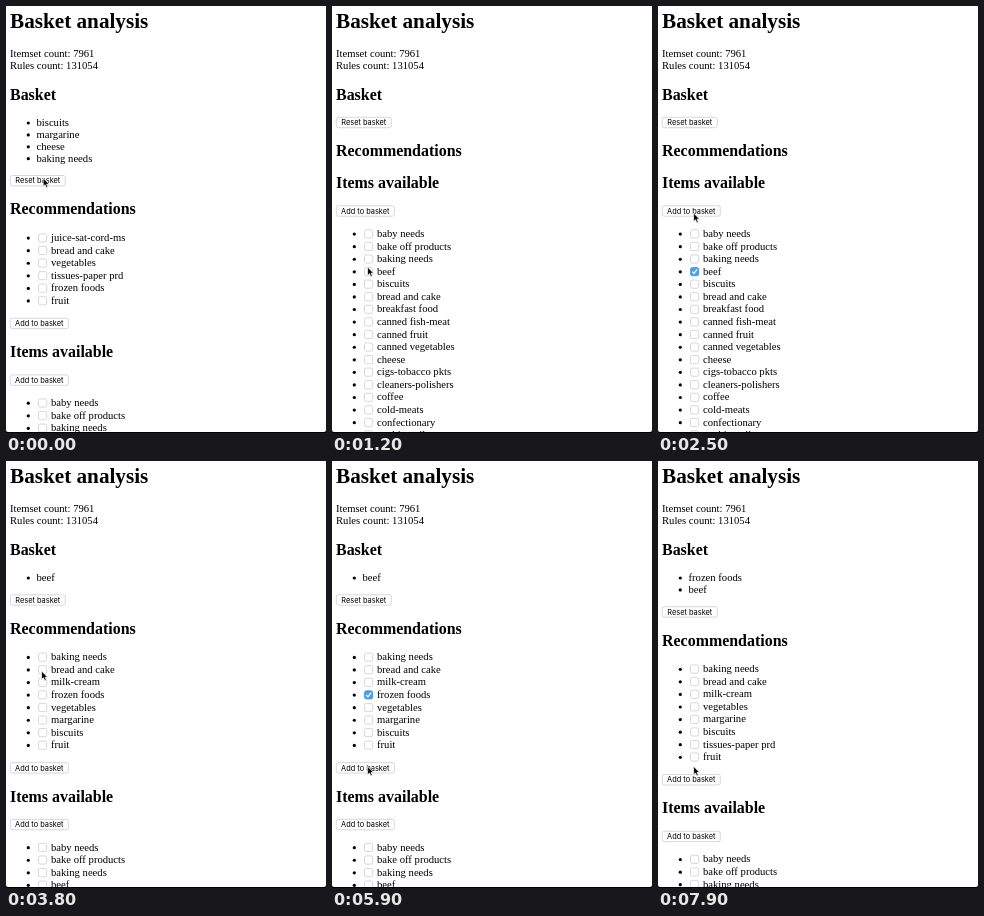
Animation, 320 px wide and 427 px high, one loop 8 s. Source, as an HTML page:

```html
<!DOCTYPE html>
<html lang="en">
<head>
<meta charset="utf-8">
<title>Basket analysis</title>
<style>
  html, body { margin: 0; height: 100%; overflow: hidden; background: #fff; }
  svg { display: block; width: 100%; height: 100%; }
  text { font: 10.64px "Liberation Serif", Times, serif; white-space: pre; }
  .h1 { font-size: 21.2px; font-weight: bold; }
  .h2 { font-size: 15.94px; font-weight: bold; }
  .label { font: 7.4px Inter, "Liberation Sans", sans-serif; text-anchor: middle; }
  .control { fill: #fff; stroke: #c8c8c8; stroke-width: .7; }
  .on { fill: #4a9fea; stroke: #3d8fdc; }
  .pressed { fill: #fff; }
</style>
</head>
<body>
<svg viewBox="0 0 320 427">
  <g id="page"></g>
  <path id="cursor" d="M0 0V8.4L1.9 6.7L3.2 9.7L4.7 9L3.4 6.2H6Z" stroke="#fff" stroke-width=".7"/>
  <path d="M0 424Q0 426 2 426H318Q320 426 320 424V427H0Z"/>
</svg>
<script>
const DURATION = 8000, STEP = 100;
const LINE = 11.9, ROW = 12.57;

const available = ["baby needs", "bake off products", "baking needs", "beef", "biscuits",
  "bread and cake", "breakfast food", "canned fish-meat", "canned fruit", "canned vegetables",
  "cheese", "cigs-tobacco pkts", "cleaners-polishers", "coffee", "cold-meats",
  "confectionary", "cooking oils"];

// Page states, each valid from its start time.
const states = [
  { at: 0, basket: ["biscuits", "margarine", "cheese", "baking needs"],
    tips: ["juice-sat-cord-ms", "bread and cake", "vegetables", "tissues-paper prd", "frozen foods", "fruit"] },
  { at: 100, basket: [], tips: [] },
  { at: 1500, basket: [], tips: [], checked: "beef" },
  { at: 2600, basket: ["beef"],
    tips: ["baking needs", "bread and cake", "milk-cream", "frozen foods", "vegetables", "margarine", "biscuits", "fruit"] }
];
states.push({ ...states[3], at: 5000, checked: "frozen foods" });
states.push({ ...states[4], at: 6000, pressed: true });
states.push({ ...states[4], at: 6100 });
states.push({ at: 6400, basket: ["frozen foods", "beef"],
  tips: ["baking needs", "bread and cake", "milk-cream", "vegetables", "margarine", "biscuits", "tissues-paper prd", "fruit"] });

// Pointer moves: start, end, x, y reached.
const moves = [
  [400, 1200, 35.6, 261], [1800, 2100, 35.6, 225], [2200, 2500, 35.6, 207],
  [3700, 3800, 35.6, 210], [3800, 4600, 35.6, 231], [5300, 5900, 35.6, 305.3]
];

const text = (x, y, str, cls = "") => `<text x="${x}" y="${y}" class="${cls}">${str}</text>`;
const bullet = y => `<circle cx="22.3" cy="${y + .3}" r="1.6"/>`;

function button(y, label, width, pressed) {
  return `<rect x="4.3" y="${y - 5.2}" width="${width}" height="10.4" rx="2" class="control ${pressed ? "on" : ""}"/>`
    + text(4.3 + width / 2, y + 2.7, label, "label" + (pressed ? " pressed" : ""));
}

function checkRow(y, label, checked) {
  const tick = `<path d="M34.3 ${y + .2}l1.7 1.9l3 -4.2" fill="none" stroke="#fff" stroke-width="1.2"/>`;
  return bullet(y)
    + `<rect x="32.5" y="${y - 4}" width="8.2" height="8.2" rx="1.8" class="control ${checked ? "on" : ""}"/>`
    + (checked ? tick : "") + text(45, y + 3.2, label);
}

function drawPage({ basket, tips, checked, pressed }) {
  const rows = (items, top) => items.map((s, i) => checkRow(top + i * ROW, s, s === checked)).join("");
  let out = text(4, 22.3, "Basket analysis", "h1")
    + text(4, 51, "Itemset count: 7961") + text(4, 63, "Rules count: 131054")
    + text(4, 93.7, "Basket", "h2");
  basket.forEach((s, i) => out += bullet(116.7 + i * LINE) + text(30.5, 120 + i * LINE, s));

  let y = basket.length ? 127.1 + basket.length * LINE : 116.5;
  out += button(y, "Reset basket", 55, false);
  y += 28.7;
  out += text(4, y + 5, "Recommendations", "h2");
  if (tips.length) {
    y += 28.4;
    out += rows(tips, y);
    y += tips.length * ROW + 10.2;
    out += button(y, "Add to basket", 58, pressed);
    y += 28.7;
  } else {
    y += 31.8;
  }
  out += text(4, y + 5, "Items available", "h2");
  y += 28;
  out += button(y, "Add to basket", 58, false);
  return out + rows(available, y + 22.8);
}

function pointerAt(t) {
  let x = 37.2, y = 172;
  for (const [start, end, toX, toY] of moves) {
    const p = Math.min(1, Math.max(0, (t - start) / (end - start)));
    const ease = p * p * (3 - 2 * p);
    x += (toX - x) * ease;
    y += (toY - y) * ease;
  }
  return [x, y];
}

const page = document.getElementById("page");
const cursor = document.getElementById("cursor");
let shown;

function render(now) {
  const t = Math.floor(now % DURATION / STEP) * STEP;
  const state = states.findLast(s => s.at <= t);
  if (state !== shown) page.innerHTML = drawPage(shown = state);
  cursor.setAttribute("transform", `translate(${pointerAt(t)})`);
}

const origin = performance.now();
function loop() {
  render(performance.now() - origin);
  requestAnimationFrame(loop);
}
loop();
</script>
</body>
</html>
```
